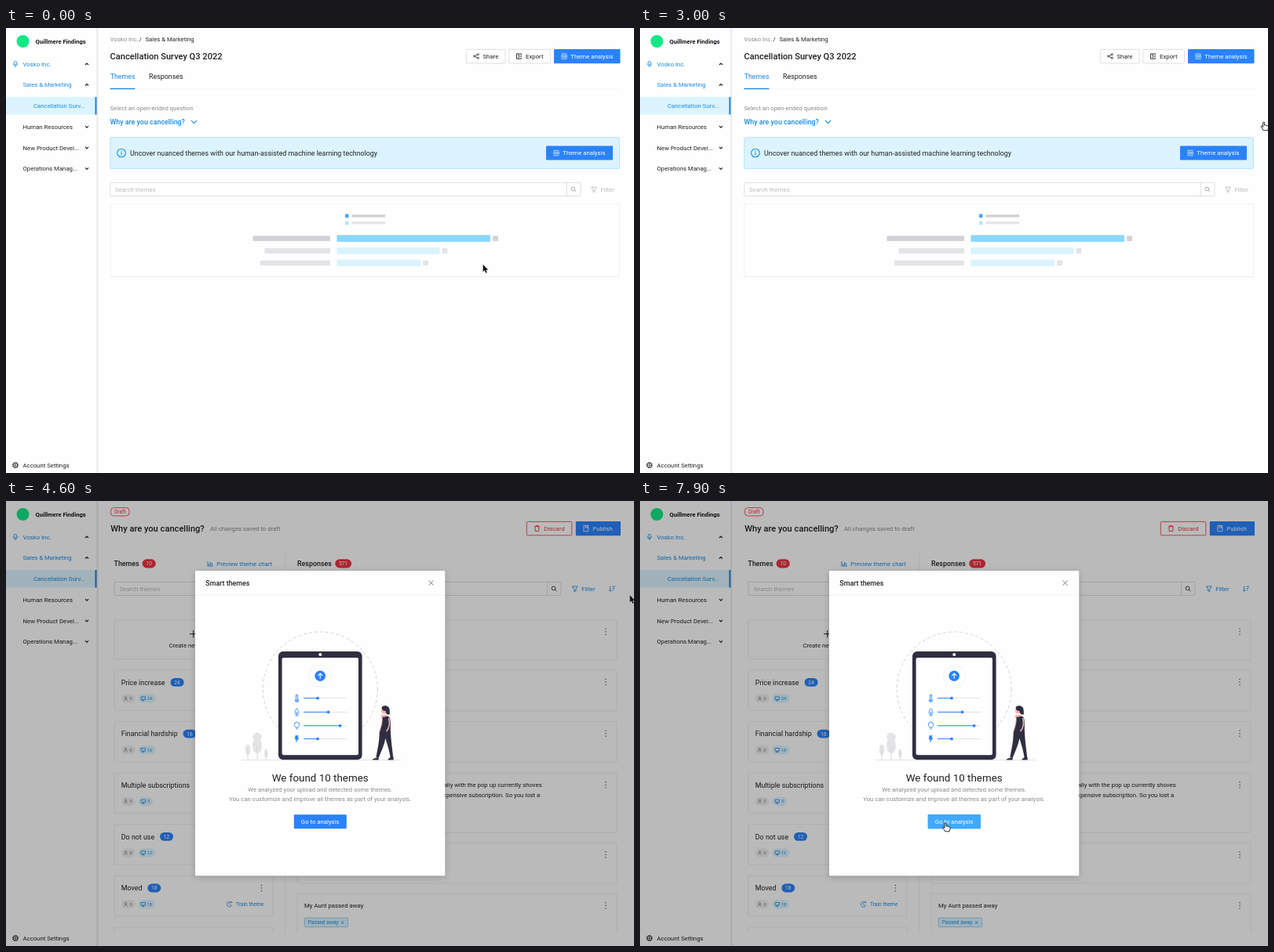
An HTML page that plays this animation: 800 px wide and 568 px high, repeating every 8000 ms.

```html
<!DOCTYPE html>
<html lang="en">
<head>
<meta charset="utf-8">
<title>Survey themes</title>
<style>
html, body { margin: 0; width: 100%; height: 100%; overflow: hidden; background: #fefefe; }
svg { display: block; width: 800px; height: 568px; }
text { font-family: Roboto, Arial, sans-serif; white-space: pre; }
</style>
</head>
<body>
<svg id="stage" viewBox="0 0 800 568" width="800" height="568"></svg>
<script>
const LOOP = 8000, PAGE_AT = 3200, MODAL_AT = 3500;
const S = 7.78, M = 8.89, XS = 6.67, XXS = 5.56, L = 11.11;
const INK = '#202124', BLUE = '#1b8ae4', BTN = '#2a82fb', GREY = '#8a8a8e', PALE = '#b9b9bd',
  LINE = '#ededf0', EDGE = '#d6d6da', RED = '#ec3440', SKY = '#dcf4ff';

const rect = (x, y, x2, y2, fill, stroke = 'none', r = 0, extra = '') =>
  `<rect x="${x}" y="${y}" width="${x2 - x}" height="${y2 - y}" rx="${r}" fill="${fill}" stroke="${stroke}" stroke-width=".8" ${extra}/>`;
const path = (d, stroke = INK, w = 1, fill = 'none', extra = '') =>
  `<path d="${d}" fill="${fill}" stroke="${stroke}" stroke-width="${w}" ${extra}/>`;
const dot = (x, y, r, fill, stroke = 'none', w = .8, extra = '') =>
  `<circle cx="${x}" cy="${y}" r="${r}" fill="${fill}" stroke="${stroke}" stroke-width="${w}" ${extra}/>`;
// y is the middle of the capitals
const text = (x, y, s, size = S, fill = INK, weight = 400, anchor = 'start') =>
  `<text x="${x}" y="${(y + size * .356).toFixed(2)}" font-size="${size}" fill="${fill}" font-weight="${weight}" text-anchor="${anchor}">${s}</text>`;
const at = (x, y, body) => `<g transform="translate(${x} ${y})">${body}</g>`;

const icon = {
  chevron: (x, y, dir, c = INK, w = 1.2, k = 2) => at(x, y, path(`M${-k} ${-dir * k / 2}L0 ${dir * k / 2}L${k} ${-dir * k / 2}`, c, w)),
  search: (x, y, c) => at(x, y, dot(-.6, -.6, 2.4, 'none', c, .9) + path('M1.2 1.2L3.3 3.3', c, .9)),
  filter: (x, y, c) => at(x, y, path('M-3.3-3H3.3L1.1 .4V3.2H-1.1V.4Z', c, .9)),
  sort: (x, y) => at(x, y, path('M-2.3-3.4V3.2M-3.8 1.6L-2.3 3.2L-.8 1.6M.6-2.8H4M.6-.4H3.2M.6 2H2.2', BLUE, .9)),
  dots: (x, y) => [-3.6, 0, 3.6].map(d => dot(x, y + d, .75, '#55565a')).join(''),
  cross: (x, y, k, c, w) => at(x, y, path(`M${-k} ${-k}L${k} ${k}M${k} ${-k}L${-k} ${k}`, c, w)),
  grid: (x, y) => at(x, y, path('M-3.6-3.2H3.6M-3.6 3.3H3.6M-3.3-1.4H-1V1.4H-3.3ZM.2-1.6V1.6M1.6-1.4H3.4V1.4H1.6Z', '#d9e9ff', .8)),
  info: (x, y) => dot(x, y, 2.5, '#85858a') + path(`M${x} ${y - .3}v1.6M${x} ${y - 1.5}v.6`, '#fff', .6),
  share: (x, y) => at(x, y, path('M2.4-2.3L-2.4 0L2.4 2.3', INK, .8) + dot(2.4, -2.3, 1.1, '#fff', INK) + dot(-2.4, 0, 1.1, '#fff', INK) + dot(2.4, 2.3, 1.1, '#fff', INK)),
  export: (x, y) => at(x, y, path('M2.8-1.6V-3.1H-3V3.3H2.8V1.8M-.8 0H3.6M-1.4-1.6H.4M-1.4 1.7H.4', INK, .9)),
  trash: (x, y) => at(x, y, path('M-3.4-2.3H3.4M-1.3-2.3V-3.6H1.3V-2.3M-2.5-2.3L-2.2 3.5H2.2L2.5-2.3', RED, .9)),
  book: (x, y) => at(x, y, path('M-3-3.7H3V3.7H-3ZM-.8-3.7V-.4L.5-1.4L1.8-.4V-3.7', '#fff', .8)),
  clock: (x, y) => at(x, y, path('M2.6-2A3.3 3.3 0 1 0 3.2 1M0-1.8V.2L1.5 1M1.2-2.2H3V-3.8', BLUE, .8)),
  chart: (x, y) => at(x, y, path('M-3.3-3V3H3.6M-1.5 2V0M.3 2V-2M2.1 2V-1', BLUE, .9)),
  user: (x, y) => at(x, y, dot(0, -1.2, 1.2, 'none', '#77777b', .7) + path('M-2 2.5C-2 0 2 0 2 2.5', '#77777b', .7)),
  screen: (x, y) => at(x, y, path('M-2.7-2.2H2.7V1.3H-2.7ZM0 1.3V2.7M-1.5 2.7H1.5', BLUE, .8))
};

function sidebar() {
  const item = (y, s, dir, c = INK) => text(21.5, y, s, S, c) + icon.chevron(103, y, dir);
  return rect(115, 0, 118.5, 568, 'url(#shade)') + rect(0, 0, 115.5, 568, '#fefefe') +
    dot(21.5, 17, 8, '#12e886') +
    text(37.5, 17, 'Quillmere Findings', 7.6, '#15161c', 700) +
    at(12, 46, rect(-1.6, -3.6, 1.6, 1, 'none', BLUE, 1.6) + path('M-2.9-.6C-2.9 3 2.9 3 2.9-.6M0 2.2V4', BLUE, .8)) +
    item(46, 'Vosko Inc.', -1, BLUE) + item(72.5, 'Sales &amp; Marketing', -1, BLUE) +
    rect(0, 88, 115, 110.5, SKY) + rect(113.5, 88, 115.5, 110.5, '#1a7fd4') +
    text(35, 99.3, 'Cancellation Surv...', S, BLUE) +
    item(126.2, 'Human Resources', 1) + item(152.8, 'New Product Devel...', 1) + item(179.4, 'Operations Manag...', 1) +
    dot(12, 558, 3, 'none', INK, 1) + dot(12, 558, 3.6, 'none', INK, .8, 'stroke-dasharray="1.4 1.43"') + dot(12, 558, 1.2, 'none', INK) +
    text(21.5, 558, 'Account Settings');
}

function themeButton(x, y, x2, y2) {
  const mid = (y + y2) / 2;
  return rect(x, y, x2, y2, BTN, 'none', 1) + icon.grid(x + 13, mid) + text(x + 21.3, mid, 'Theme analysis', S, '#fff');
}

function surveyPage() {
  const bar = (x, y, end, main, grey) =>
    rect(x, y + 1, 413, y + 7.6, grey) + rect(421.5, y, end, y + 8.6, main) + rect(end + 3.2, y + 1, end + 10, y + 7.6, grey);
  return text(132.5, 14.3, 'Vosko Inc.', S, GREY) + text(169.5, 14.3, '/') + text(177.5, 14.3, 'Sales &amp; Marketing') +
    text(132.5, 35.8, 'Cancellation Survey Q3 2022', L, INK, 500) +
    rect(586.4, 27.4, 636, 45, '#fff', EDGE, 1) + icon.share(599, 36) + text(607.5, 36.2, 'Share') +
    rect(640.8, 27.4, 693.4, 45, '#fff', EDGE, 1) + icon.export(653.5, 36) + text(662, 36.2, 'Export') +
    themeButton(698, 27, 782.5, 45.2) +
    text(132.7, 62.3, 'Themes', M, BLUE) + text(182, 62.3, 'Responses', M) +
    rect(132.5, 77.6, 782, 78.2, LINE) + rect(132.5, 76.8, 164.5, 78.2, BLUE) +
    text(132.5, 102, 'Select an open-ended question', S, GREY) +
    text(132.5, 119.5, 'Why are you cancelling?', M, BLUE, 500) + icon.chevron(239.5, 119.7, 1, BLUE, 1.1, 3.6) +
    rect(132.8, 139.8, 781.4, 179.4, SKY, '#a5defa', 1) +
    dot(147, 159.5, 5.3, 'none', BLUE, 1.1) + path('M147 158.6V162.4M147 156.3V157.5', BLUE, 1.1) +
    text(158, 159.4, 'Uncover nuanced themes with our human-assisted machine learning technology', M) +
    themeButton(688, 150.4, 773, 168.6) +
    rect(132.9, 197.3, 731.8, 214.4, '#fff', EDGE, 1) + path('M714.2 197.3V214.4', EDGE, .8) +
    text(139, 206, 'Search themes', S, PALE) + icon.search(723, 206, '#a0a0a5') +
    icon.filter(749, 206, PALE) + text(757.5, 206, 'Filter', S, PALE) +
    rect(132.9, 224.7, 781.6, 317.5, '#fefefe', LINE) +
    rect(432, 237.5, 436.5, 242, '#4ba3f0') + rect(440.5, 238.2, 483, 241.6, '#d0d1d5') +
    rect(432, 246.8, 436.5, 251.2, '#b6e5fd') + rect(440.5, 247.2, 483, 250.4, '#e5e5e9') +
    bar(314.5, 264.3, 617, '#8ad6fd', '#d1d1d6') + bar(329.5, 280.1, 552.4, '#daf3ff', '#e3e3e7') + bar(324, 295.6, 528, '#daf3ff', '#e3e3e7');
}

function themeCard([title, n, bx], i) {
  const y = 215.8 + i * 65.65, w = n > 9 ? 17 : 13;
  return rect(138, y, 340, y + 51.6, '#fefefe', LINE, 1) + text(146.8, y + 15.7, title, M) +
    rect(bx, y + 10.2, bx + w, y + 21, BTN, 'none', 5.4) + text(bx + w / 2, y + 15.7, n, XS, '#fff', 400, 'middle') +
    icon.dots(325.5, y + 15.7) +
    rect(147, y + 30.8, 164.6, y + 41.8, '#efeff1', 'none', 5.5) + icon.user(152.5, y + 36.3) + text(157.6, y + 36.3, '0', XXS, '#77777b') +
    rect(168.6, y + 30.8, n > 9 ? 190.4 : 187, y + 41.8, SKY, 'none', 5.5) + icon.screen(174.8, y + 36.3) + text(180, y + 36.3, n, XXS, BLUE) +
    icon.clock(284.6, y + 36.3) + text(293, y + 36.3, 'Train theme', XS, BLUE);
}

function responseCard([y, lines, tag, tagEnd]) {
  const last = y + 15.3 + (lines.length - 1) * 12.2;
  const foot = tag
    ? rect(380.3, last + 15.7, tagEnd, last + 27.2, SKY, '#7accf6', 1) + text(384.7, last + 21.5, tag, XS, BLUE) + icon.cross(tagEnd - 7, last + 21.5, 1.7, BLUE, .8)
    : icon.info(382.6, last + 20.8) + text(388, last + 20.8, 'No themes identified', XXS, GREY);
  return rect(371, y, 778, last + 36.4, '#fefefe', LINE, 1) +
    lines.map((s, i) => text(380, y + 15.3 + i * 12.2, s)).join('') + foot + icon.dots(764, y + 15.1);
}

function analysisPage() {
  const themes = [['Price increase', 24, 209.6], ['Financial hardship', 16, 225.5], ['Multiple subscriptions', 5, 241],
    ['Do not use', 12, 196], ['Moved', 18, 180.3], ['Billing', 9, 180]];
  const replies = [
    [151.7, ['Service is now overpriced.']],
    [216, ['Financial Hardship'], 'Financial Hardship', 452],
    [281.6, ['You continue to raise your prices'], 'Raising prices', 438],
    [347.3, ['Your price is just not worth keeping anymore especially with the pop up currently shoves',
      'iny face forcing me to make a choice for the more expensive subscription. So you lost a', 'subscriber have a nice life']],
    [436.3, ['The cost is going up much']],
    [501.2, ['My Aunt passed away'], 'Passed away', 435.6]];
  const box = (x, split, end, s) => rect(x, 103.3, end, 120.5, '#fff', EDGE, 1) + path(`M${split} 103.3V120.5`, EDGE, .8) +
    text(x + 6.5, 112, s, S, PALE) + icon.search((split + end) / 2, 112, INK);
  const tools = (x, sx) => icon.filter(x, 112, BLUE) + text(x + 8.4, 112, 'Filter', S, BLUE) + icon.sort(sx, 112);
  const pill = (x, w, s) => rect(x, 74.3, x + w, 85.4, RED, 'none', 5.5) + text(x + w / 2, 79.9, s, XS, '#fff', 400, 'middle');
  return rect(133.5, 8.6, 157, 19, '#fff', RED, 4) + text(145.3, 13.8, 'Draft', XS, RED, 400, 'middle') +
    text(133.3, 35, 'Why are you cancelling?', L, INK, 500) + text(260, 35, 'All changes saved to draft', S, GREY) +
    rect(663.3, 26.4, 720.8, 43.8, '#fff', RED, 1) + icon.trash(676.5, 35) + text(685.3, 35, 'Discard', S, RED) +
    rect(725.8, 26, 783, 44.2, BTN, 'none', 1) + icon.book(738.8, 35) + text(747.3, 35, 'Publish', S, '#fff') +
    path('M355.5 66V552', LINE, .8) +
    text(137.5, 79.9, 'Themes', M, INK, 500) + pill(173.6, 17.2, '10') +
    icon.chart(260.3, 80) + text(268.3, 79.9, 'Preview theme chart', S, BLUE) +
    text(371, 79.9, 'Responses', M, INK, 500) + pill(419.3, 20.8, '571') +
    box(138, 257.6, 275.4, 'Search themes') + tools(288.5, 332) +
    box(367, 689.5, 706.8, 'Search responses') + tools(724.8, 772) +
    `<g clip-path="url(#list)">` +
    rect(138, 152.2, 340, 201.8, '#fefefe', LINE, 1) + path('M238.7 165V174.4M234 169.7H243.4', INK, 1) + text(238.7, 183.8, 'Create new theme', S, INK, 400, 'middle') +
    themes.map(themeCard).join('') + replies.map(responseCard).join('') +
    `<g id="focus">` + rect(371, 151.7, 778, 203.2, 'none', '#8fd3f0', 1) + '</g></g>';
}

function picture() {
  const DARK = '#2f2e41', SKIN = '#f5b5b0', TREE = '#e4e4e7';
  const slider = (y, end) => path(`M379 ${y}H434`, '#dcdce0', .8) + path(`M379 ${y}H${end}`, BTN, 1) + dot(end, y, 1.9, BTN);
  const tree = (x, y, rx, ry) => `<ellipse cx="${x}" cy="${y}" rx="${rx}" ry="${ry}" fill="${TREE}"/>` + path(`M${x} ${y}V330.5`, '#d5d5d9', .8);
  return dot(400.3, 240, 73, 'none', '#c9c9ce', .8, 'stroke-dasharray="4 3"') +
    path('M300 330.7H503', '#dcdce0', .8) +
    tree(308, 317.5, 3.2, 7) + tree(331.4, 322, 2.3, 5.2) + dot(320, 301.5, 5.8, TREE) + tree(320, 312.5, 6, 9.5) +
    rect(347, 192, 453.6, 330.3, DARK, 'none', 6) + rect(351.6, 200, 449, 324.2, '#fefefe', 'none', 2) + dot(400.3, 196, 2, '#fff') +
    dot(400.2, 223.3, 13.8, 'none', '#dfe2ea', .7, 'stroke-dasharray="2 1.2"') + dot(400.2, 223.3, 6.8, BTN) +
    path('M400.2 226.8V220.2M397.4 222.8L400.2 220L403 222.8', '#fff', 1.1) +
    slider(251.7, 397) + slider(269.4, 410.6) + slider(286.8, 425.6) + slider(303.6, 397) +
    at(370.5, 251.7, path('M-1-4.4H1V1A2.1 2.1 0 1 1-1 1Z', BTN, .9) + dot(0, 2.7, 1.2, BTN)) +
    at(370.5, 269.4, path('M0-4.6C3-1 3.2 3 0 3.2C-3.2 3-3-1 0-4.6M0-.5V3M-2 4.5H2', BTN, .9)) +
    at(370.5, 286.8, path('M-1.4 2.4C-1.4 1-3.2.6-3.2-1.4A3.2 3.2 0 0 1 3.2-1.4C3.2.6 1.4 1 1.4 2.4ZM-1.2 4.2H1.2', BTN, .9)) +
    at(370.5, 303.6, path('M-1.8-4.2H2L.8-1H2.6L-1.2 4.4L-.4.6H-2.4Z', BTN, .4, BTN)) +
    // walking figure
    path('M481 276C478 282 479 288 475.5 297', SKIN, 1.8) +
    path('M478 273H486V277H478Z', 'none', 0, SKIN) + dot(481.6, 268, 3.6, SKIN) +
    path('M478.5 264C479 260 488 260 488.6 266L489 272C486 273.5 484 272 483.4 268C481 268 479 267 478.5 264Z', 'none', 0, DARK) +
    path('M479.5 275.5C482 277 485 273 488 275.5C491 279 489.5 288 490 295C490.4 306 492 316 493.2 327H489.6C488 317 485.5 310 483.4 303C482 311 478 320 474.6 328L471.4 327C473 318 475.5 308 475.6 299C476 291 480.5 287 479.5 275.5Z', 'none', 0, DARK) +
    path('M487.6 277C489.6 284 488 290 484.6 294', SKIN, 1.6) +
    path('M472 327.4L467 329.4V330.4H474.6L474.8 327.8ZM489.8 327L486.6 329.4V330.4H493.6V327Z', 'none', 0, DARK);
}

function modal() {
  return rect(0, 0, 800, 568, '#000', 'none', 0, 'fill-opacity=".27"') +
    rect(241, 89, 559.2, 478.3, '#fefefe', 'none', 1, 'filter="url(#drop)"') +
    text(254.3, 104.5, 'Smart themes', M, INK, 500) + icon.cross(541.6, 104.6, 3.1, '#6c6c70', .9) +
    path('M241 120H559.2', LINE, .7) + picture() +
    text(400.2, 353, 'We found 10 themes', 13.4, INK, 400, 'middle') +
    text(400.2, 368.6, 'We analyzed your upload and detected some themes.', S, GREY, 400, 'middle') +
    text(400.2, 380.6, 'You can customize and improve all themes as part of your analysis.', S, GREY, 400, 'middle') +
    rect(366.8, 400.3, 433.8, 418.3, BTN, 'none', 1) +
    rect(366.8, 400.3, 433.8, 418.3, '#40a9ff', 'none', 1, 'id="hover"') +
    text(400.2, 409.4, 'Go to analysis', S, '#fff', 400, 'middle');
}

const arrow = path('M0 0V9.4L2.1 7.5L3.7 11L5.3 10.3L3.8 6.9H6.6Z', '#fff', .7, '#111', 'stroke-linejoin="round" paint-order="stroke"');
const hand = path('M-1 1C-1-.3 1-.3 1 1V4.2C1.6 3.5 2.7 3.7 2.9 4.6C3.6 4.1 4.5 4.4 4.6 5.1C5.4 4.8 6.1 5.2 6.1 6V7.6C6.1 9 5.2 9.4 5 10.8H-.4C-1 8.8-2.6 7.6-3.4 6C-3.7 4.9-2.4 4.6-1.8 5.4L-1 6.4Z', '#111', .9, '#fff', 'stroke-linejoin="round"');

const stage = document.getElementById('stage');
stage.innerHTML = `<defs>
<linearGradient id="shade"><stop stop-color="#dedee2"/><stop offset="1" stop-color="#fefefe"/></linearGradient>
<clipPath id="list"><rect x="118" y="140" width="682" height="411"/></clipPath>
<filter id="drop" x="-10%" y="-10%" width="120%" height="120%"><feDropShadow dx="0" dy="2" stdDeviation="4" flood-opacity=".2"/></filter>
</defs><rect width="800" height="568" fill="#fefefe"/>
<g id="survey">${surveyPage()}</g><g id="analysis">${analysisPage()}</g>${sidebar()}
<g id="modal">${modal()}</g><g id="cursor"><g id="arrow">${arrow}</g><g id="hand">${hand}</g></g>`;

const el = {};
for (const id of ['survey', 'analysis', 'focus', 'modal', 'hover', 'cursor', 'arrow', 'hand']) el[id] = document.getElementById(id);
const show = (id, on) => el[id].setAttribute('display', on ? 'inline' : 'none');

const both = u => u * u * (3 - 2 * u), speedUp = u => u * u, slowDown = u => 1 - (1 - u) * (1 - u);
// start, end, target x, target y, easing
const moves = [[50, 900, 732.2, 161, both], [2650, 3000, 794.6, 120, both],
  [5350, 5700, 628.4, 253.6, speedUp], [5700, 6350, 389, 411, slowDown]];

function pointer(t) {
  let x = 607.6, y = 301.8;
  for (const [a, b, tx, ty, ease] of moves) {
    const u = ease(Math.min(1, Math.max(0, (t - a) / (b - a))));
    x += (tx - x) * u;
    y += (ty - y) * u;
  }
  return [x, y];
}

function draw(t) {
  const [x, y] = pointer(t), open = t >= MODAL_AT, swapped = t >= PAGE_AT;
  const overBanner = !swapped && t > 500 && y < 168.6 && x > 688;
  const overGo = open && x < 433.8 && y > 400.3;
  show('survey', !swapped);
  show('analysis', swapped);
  show('focus', !open);
  show('modal', open);
  show('hand', overBanner || overGo);
  show('arrow', !(overBanner || overGo));
  el.hover.setAttribute('opacity', overGo ? Math.min(1, Math.max(0, (t - 6100) / 250)) : 0);
  el.cursor.setAttribute('transform', `translate(${x.toFixed(2)} ${y.toFixed(2)})`);
}

const start = performance.now();
function tick(now) {
  draw(Math.max(0, now - start) % LOOP);
  requestAnimationFrame(tick);
}
draw(0);
requestAnimationFrame(tick);
</script>
</body>
</html>
```
